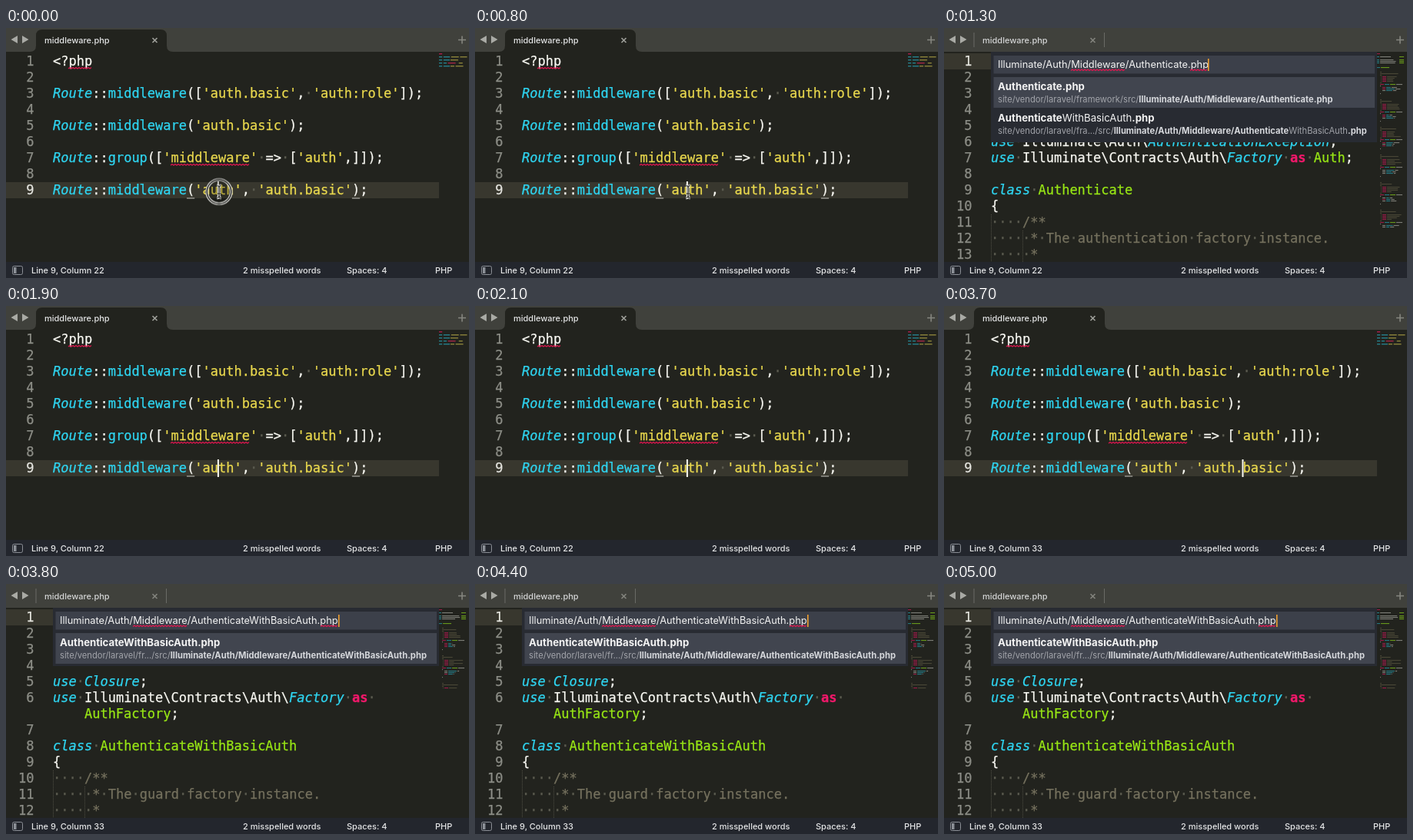
These frames come from a looping animation (602 by 326 pixels, 5.1 s). An HTML page:

```html
<!DOCTYPE html>
<html lang="en">
<head>
<meta charset="utf-8">
<title>Editor: go to middleware</title>
<style>
  html, body { margin: 0; width: 100%; height: 100%; overflow: hidden; background: #22231e; }
  svg { display: block; width: 602px; height: 326px; }
  text { font-family: Inter, "Open Sans", sans-serif; font-size: 11px; fill: #e4e5e6; white-space: pre; }
  .code, .num {
    font-family: "DejaVu Sans Mono", Menlo, monospace; font-size: 17px;
    color: #f8f8f2; fill: currentColor; stroke: currentColor; stroke-width: .25;
  }
  .num { color: #8d8e87; text-anchor: end; }
  .num.on { color: #e6e6e0; }
  .t { color: #2fd6f2; font-style: italic; }
  .f { color: #2fd6f2; }
  .s { color: #ead94e; }
  .g { color: #98e615; }
  .k { color: #f0186a; font-weight: bold; }
  .c { color: #75715e; }
  .d { color: #5b5b50; }
  .ui { font-weight: 500; }
  .input { font-size: 12.85px; fill: #f4f4f4; }
  .title { font-size: 13.2px; fill: #f4f4f4; }
  .path { font-size: 11.2px; fill: #a2a4aa; }
  .b { font-weight: bold; }
  .path .b { fill: #d6d8dc; }
  .wave { fill: none; stroke: #e0164f; stroke-width: 1.2; }

  .anim { animation: 5100ms step-end infinite; }
  #main { animation-name: main; }
  #first { animation-name: first; }
  #second { animation-name: second; }
  .col22 { animation-name: before; }
  .col33 { animation-name: after; }
  #pointer { animation: show 5100ms step-end infinite, move 5100ms ease-in-out infinite; }
  #ring { animation-name: ring; }
  @keyframes main {
    0%, 37.25% { visibility: visible; }
    25.48%, 74.5% { visibility: hidden; }
  }
  @keyframes first {
    0%, 37.25% { visibility: hidden; }
    25.48% { visibility: visible; }
  }
  @keyframes second {
    0% { visibility: hidden; }
    74.5% { visibility: visible; }
  }
  @keyframes before { 0% { opacity: 1; } 58.82% { opacity: 0; } }
  @keyframes after { 0% { opacity: 0; } 58.82% { opacity: 1; } }
  @keyframes show {
    0%, 49% { opacity: 1; }
    25.48%, 70.57% { opacity: 0; }
  }
  @keyframes move {
    0%, 49% { transform: translate(277px, 213.5px); }
    57%, 100% { transform: translate(390px, 213.5px); }
  }
  @keyframes ring {
    0%, 58.82% { opacity: 1; }
    7.84%, 66.66% { opacity: 0; }
  }
</style>
</head>
<body>
<svg id="stage" viewBox="0 0 602 326"></svg>
<script>
const X = 61, CH = 10.234, ROW = 21;
const base = row => 49 + ROW * (row - 1);

const rect = (x, y, w, h, fill, extra = '') =>
  `<rect x="${x}" y="${y}" width="${w}" height="${h}" fill="${fill}" ${extra}/>`;
const label = (x, y, str, cls = 'ui') => `<text x="${x}" y="${y}" class="${cls}">${str}</text>`;
const bold = str => `<tspan class="b">${str}</tspan>`;

// Markup: ‹class text› colours a token, · is a visible space
const paint = str => str.replace(/&/g, '&amp;').replace(/</g, '&lt;').replace(/>/g, '&gt;')
  .replace(/‹(\w) (.*?)›/g, '<tspan class="$1">$2</tspan>')
  .replace(/·/g, '<tspan class="d">·</tspan>');
const code = (row, str, indent = 0) => label(X + indent * CH, base(row), paint(str), 'code');
const num = (row, n, on) => label(36.5, base(row), n, on ? 'num on' : 'num');

function wave(x1, x2, y) {
  let d = `M${x1} ${y}`;
  for (let x = x1 + 2, up = true; x <= x2; x += 2, up = !up) d += `L${x} ${up ? y - 1.5 : y}`;
  return `<path class="wave" d="${d}"/>`;
}

function random(seed) {
  return () => (seed = (seed * 16807) % 2147483647) / 2147483647;
}

const caret = (col, cls) =>
  rect(X + (col - 1) * CH - 1, 200, 2, 23, '#f8f8f0', `class="anim ${cls}"`);

function tabBar(active) {
  const tab = active
    ? '<path d="M31 31Q39 31 39 23V10Q39 2 47 2H201Q209 2 209 10V23Q209 31 217 31Z" fill="#22231e"/>'
    : rect(38.5, 6, 1, 19, '#6a6b66') + rect(208, 6, 1, 19, '#6a6b66');
  return rect(0, 0, 602, 31, '#40413c') + tab +
    '<path d="M15 10V20L6.500 15ZM21 10V20L29.500 15Z" fill="#a9aaa5"/>' +
    '<path d="M588 15.500H598M593 10.500V20.500" stroke="#85867f" stroke-width="1.6"/>' +
    `<path d="M190.500 13L196.500 19M196.500 13L190.500 19" stroke="${active ? '#a0a19c' : '#83847e'}" stroke-width="1.6"/>` +
    `<g opacity="${active ? 1 : .9}">${label(50, 20, 'middleware.php')}</g>`;
}

function mainMap() {
  const bar = (x, row, w, fill) => rect(563 + x * .83, 33 + row * 2, w * .83, 1.4, fill);
  const route = row => bar(0, row, 5, '#2795a5') + bar(7, row, 10, '#2795a5');
  return '<g opacity=".8">' + bar(0, 0, 5, '#d01a55') +
    route(2) + bar(19, 2, 12, '#a59a42') + bar(33, 2, 11, '#a59a42') +
    route(4) + bar(18, 4, 12, '#a59a42') +
    bar(0, 6, 5, '#2795a5') + bar(7, 6, 5, '#2795a5') + bar(14, 6, 12, '#c0264f') + bar(31, 6, 6, '#a59a42') +
    route(8) + bar(18, 8, 6, '#a59a42') + bar(26, 8, 12, '#a59a42') + '</g>';
}

// Repeats a doc block with tags, a signature and a body down the strip
function classMap(lines, seed) {
  const rnd = random(seed);
  const cyan = '#2795a5', green = '#7fc01a', red = '#c01a55', grey = '#9a9b94', dim = '#56533f';
  let out = '';
  for (let i = 0; i < lines; i++) {
    const bar = (x, w, fill) => out += rect(563 + x, 33 + i * 2, w, 1.1, fill);
    const part = (i - 12) % 18;
    if (i === 0) {
      bar(0, 4, red);
    } else if (i === 2 || (i > 3 && i < 7)) {
      bar(0, 3, cyan);
      bar(4, 14 + rnd() * 10, grey);
      bar(29, 6, green);
    } else if (i === 9) {
      bar(0, 4, cyan);
      bar(5, 11, green);
    } else if (part > 2 && part < 7) {
      bar(5, 1, dim);
      bar(7, 5, red);
      bar(13, 5 + rnd() * 14, dim);
    } else if (part >= 0 && part < 8) {
      bar(4, part === 1 ? 12 + rnd() * 14 : 2, dim);
    } else if (part === 8) {
      bar(4, 5, red);
      bar(10, 6, cyan);
      bar(17, 7, green);
      bar(25, 8, grey);
    } else if (part === 9 || part === 14) {
      bar(4, 1, grey);
    } else if (part > 9 && part < 13) {
      const w = 3 + rnd() * 8;
      bar(7, 4, rnd() < .5 ? red : grey);
      bar(12, w, cyan);
      bar(13 + w, rnd() * 8, grey);
    }
  }
  return `<g opacity=".75">${out}</g>`;
}

const underlined = col => rect(X + col * CH, 221.500, CH, 1, '#c8c8c0');

function mainView() {
  let out = tabBar(true) + rect(0, 201, 563, ROW, '#38372e');
  for (let n = 1; n <= 9; n++) out += num(n, n, n === 9);
  const call = '‹t Route›::‹f middleware›';
  return out +
    code(1, '<?php') + wave(81, 112, 53) +
    code(3, call + "([‹s 'auth.basic'›,·‹s 'auth:role'›]);") +
    code(5, call + "(‹s 'auth.basic'›);") +
    code(7, "‹t Route›::‹f group›([‹s 'middleware'›·=>·[‹s 'auth'›,]]);") + wave(214, 317, 179) +
    code(9, call + "(‹s 'auth'›,·‹s 'auth.basic'›);") +
    underlined(17) + underlined(38) + mainMap() +
    caret(22, 'col22') + caret(33, 'col33');
}

function panel(height, query, end, items) {
  return rect(61, 31, 502, height, '#282b32') +
    rect(64.5, 36, 495.5, 23.5, '#3c404a') + rect(64.5, 64, 495.5, 40, '#41454f') +
    label(70, 52, query, 'input') + wave(165, 235, 55.5) + wave(end - 23, end, 55.5) +
    rect(end, 40, 1.6, 16, '#f0a030') +
    items.map(([title, path], i) =>
      label(70, 81 + i * 41, title, 'title') + label(70, 97 + i * 41, path, 'path')).join('');
}

const preview = () => tabBar(false) + rect(0, 33, 563, ROW, '#38372e');
const guide = (indent, y) =>
  `<path d="M${X + indent * CH + .5} ${y}V305" stroke="#4d4d43" stroke-dasharray="1 1"/>`;
const guides = guide(0, 243) + guide(4, 264);
const dir = 'Illuminate/Auth/Middleware/';

function firstView() {
  let out = preview();
  for (let n = 1; n <= 13; n++) out += num(n, n, n === 1);
  return out +
    code(6, '‹t use›·Illuminate\\Auth\\‹t AuthenticationException›;') +
    code(7, '‹t use›·Illuminate\\Contracts\\Auth\\‹t Factory›·‹k as›·‹g Auth›;') +
    code(9, '‹t class›·‹g Authenticate›') +
    code(10, '{') + guides +
    code(11, '····‹c /**›') +
    code(12, '·····‹c *·The·authentication·factory·instance.›') +
    code(13, '·····‹c *›') + classMap(114, 71) +
    panel(118, dir + 'Authenticate.php', 343, [
      [bold('Authenticate.php'),
        'site/vendor/laravel/framework/src/' + bold(dir + 'Authenticate.php')],
      [bold('Authenticate') + 'WithBasicAuth' + bold('.php'),
        'site/vendor/laravel/fra.../src/' + bold(dir + 'Authenticate') + 'WithBasicAuth' + bold('.php')]
    ]);
}

function secondView() {
  let out = preview();
  // Line 6 wraps, so later numbers sit one row lower
  for (let n = 1; n <= 12; n++) out += num(n > 6 ? n + 1 : n, n, n === 1);
  return out +
    code(5, '‹t use›·‹t Closure›;') +
    code(6, '‹t use›·Illuminate\\Contracts\\Auth\\‹t Factory›·‹k as›·') +
    code(7, '‹g AuthFactory›;', 4) +
    code(9, '‹t class›·‹g AuthenticateWithBasicAuth›') +
    code(10, '{') + guides +
    code(11, '····‹c /**›') +
    code(12, '·····‹c *·The·guard·factory·instance.›') +
    code(13, '·····‹c *›') + classMap(52, 29) +
    panel(76, dir + 'AuthenticateWithBasicAuth.php', 432, [
      [bold('AuthenticateWithBasicAuth.php'),
        'site/vendor/laravel/fr.../src/' + bold(dir + 'AuthenticateWithBasicAuth.php')]
    ]);
}

function statusBar() {
  const column = n => `<g class="anim col${n}">${label(33, 320, 'Line 9, Column ' + n)}</g>`;
  return rect(0, 305, 602, 21, '#23262d') +
    rect(8.5, 310.5, 13, 11, 'none', 'rx="2" stroke="#8c9097"') + rect(10, 312, 3.5, 8, '#8c9097') +
    column(22) + column(33) +
    label(308, 320, '2 misspelled words') + label(443, 320, 'Spaces: 4') + label(558, 320, 'PHP');
}

function pointer() {
  const beam = 'M-3 -8Q0 -8 0 -5.500Q0 -8 3 -8M0 -6V6M-3 8Q0 8 0 5.500Q0 8 3 8M-2 2.500H2';
  return '<g id="pointer"><g id="ring" class="anim" fill="none">' +
    '<circle r="16" stroke="#1a1a18" stroke-width="3" fill="#0003"/>' +
    '<circle r="17" stroke="#d8d8d4" stroke-width="1.2"/><circle r="14.5" stroke="#d8d8d4" stroke-width="1.2"/></g>' +
    `<path d="${beam}" fill="none" stroke="#f4f4f4" stroke-width="3.2"/>` +
    `<path d="${beam}" fill="none" stroke="#15150f" stroke-width="1.2"/></g>`;
}

const view = (id, body) => `<g id="${id}" class="anim">${body}</g>`;
document.getElementById('stage').innerHTML =
  rect(0, 0, 602, 326, '#22231e') +
  view('main', mainView()) + view('first', firstView()) + view('second', secondView()) +
  statusBar() + pointer();
</script>
</body>
</html>
```
